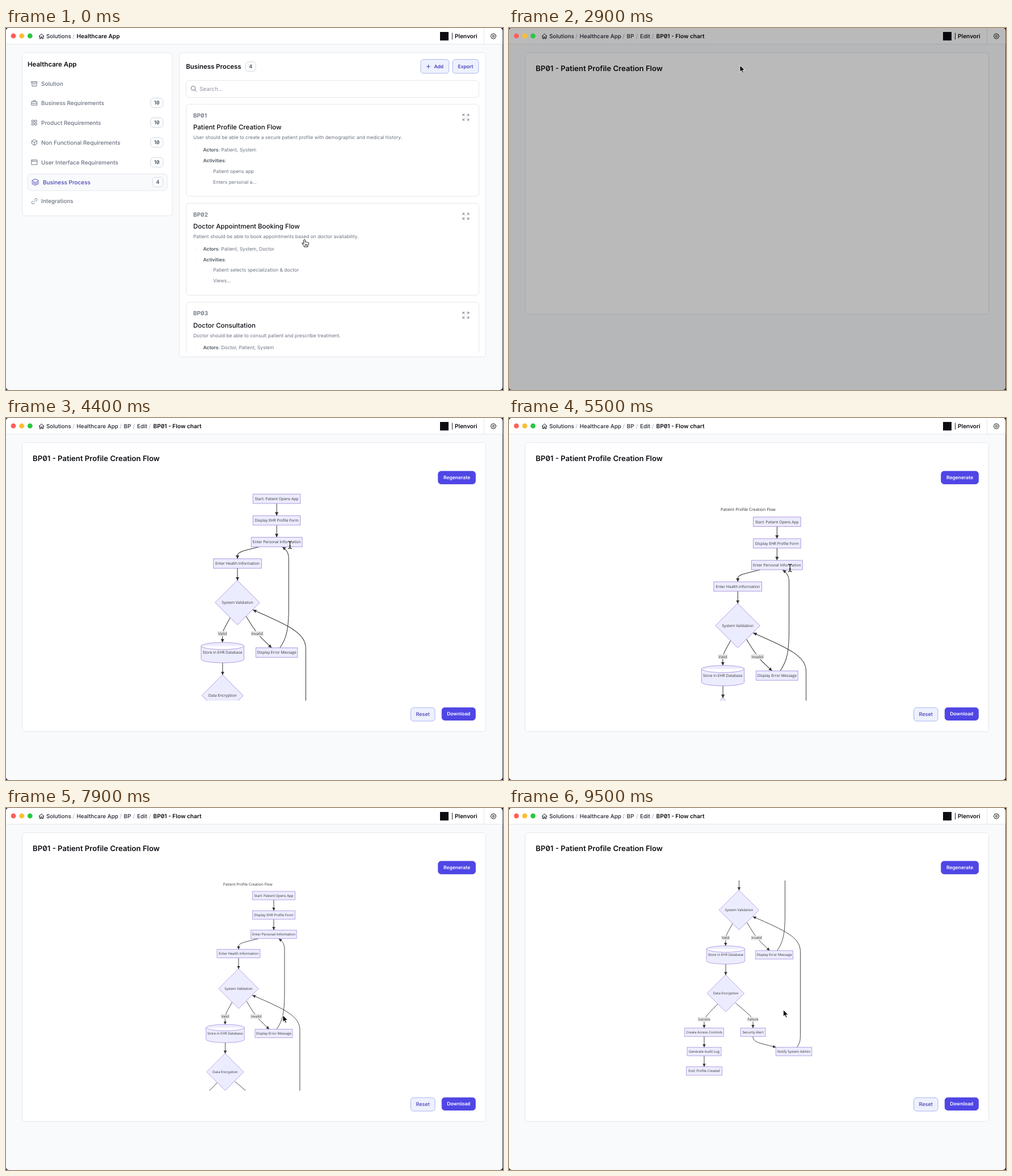
Recreate the animation shown at these times as an HTML page. Size 876 px wide and 639 px high, loop 10000 ms.

```html
<!DOCTYPE html>
<html lang="en">
<head>
<meta charset="utf-8">
<title>Business process flow</title>
<style>
html, body { margin: 0; width: 100%; height: 100%; overflow: hidden; background: #1d1830; }
svg { display: block; }
text { font-family: Inter, sans-serif; font-feature-settings: "zero"; text-rendering: geometricPrecision; white-space: pre; }
#chart text { font-family: "Open Sans", "Noto Sans", sans-serif; }
</style>
</head>
<body>
<svg id="stage" width="876" height="639" viewBox="0 0 876 639" xmlns="http://www.w3.org/2000/svg"></svg>
<script>
const LINE = '#e5e7eb', GRAY = '#6b7280', DARK = '#374151', INK = '#0b0d12';
const INDIGO = '#4f46e5', VIOLET = '#4a41b5', PALE = '#edf1fd', EDGE = '#a9b5ee';
const SMALL = 8.45, BODY = 9.87, HEAD = 11.5, BIG = 13.15;

// y is the optical centre of the line
const text = (x, y, s, size = BODY, fill = GRAY, weight = 400, anchor = 'start') =>
  `<text x="${x}" y="${y + size * 0.364}" font-size="${size}" fill="${fill}" font-weight="${weight}" text-anchor="${anchor}">${s}</text>`;
const mid = (x, y, s, size, fill, weight) => text(x, y, s, size, fill, weight, 'middle');
const bold = (s, fill = '#4b5563') => `<tspan font-weight="600" fill="${fill}">${s}</tspan>`;
const box = (x, y, w, h, fill = '#fff', stroke = LINE, r = 5) =>
  `<rect x="${x}" y="${y}" width="${w}" height="${h}" rx="${r}" fill="${fill}" stroke="${stroke}"/>`;
const path = (d, stroke = GRAY, width = 1, fill = 'none', extra = '') =>
  `<path d="${d}" fill="${fill}" stroke="${stroke}" stroke-width="${width}" stroke-linecap="round" stroke-linejoin="round" ${extra}/>`;
const dot = (x, y, r, fill) => `<circle cx="${x}" cy="${y}" r="${r}" fill="${fill}"/>`;
const at = (x, y, s) => `<g transform="translate(${x} ${y})">${s}</g>`;
const button = (x, y, w, h, s) =>
  box(x, y, w, h, INDIGO, INDIGO) + mid(x + w / 2, y + h / 2, s, 8.5, '#fff', 600);
const ghost = (x, y, w, h) => box(x, y, w, h, PALE, EDGE);

const crumbX = [71, 124.5, 207.5, 231, 259.5], slashX = [119, 202, 225.5, 253.5];

function header(names) {
  let s = `<path d="M0 0H876V28H0Z" fill="#fff"/>` + path('M0 28.5H876M842.5 0V28', LINE);
  s += at(62.5, 14.5, path('M-4.4 .2L0-4.2L4.4 .2M-3.2-.8V4.3H-1V1.2H1V4.3H3.2V-.8', INK, 1));
  names.forEach((n, i) => {
    const last = i === names.length - 1;
    s += text(crumbX[i], 14.5, n, last ? 10.1 : BODY, last ? INK : '#1f2430', last ? 600 : 500);
    if (!last) s += mid(slashX[i], 14.5, '/', BODY, '#a3a8b3');
  });
  s += '<rect x="765" y="7" width="15" height="15" fill="#0b0d12"/>' + path('M786.5 9V20', INK, .9);
  s += text(791, 14.5, 'Plenvori', 10.1, INK, 600);
  let gear = '';
  for (let i = 0; i < 32; i++) {
    const a = (i - .5) * Math.PI / 16, r = i % 4 < 2 ? 4.8 : 3.9;
    gear += (i ? 'L' : 'M') + (r * Math.cos(a)).toFixed(2) + ' ' + (r * Math.sin(a)).toFixed(2);
  }
  return s + at(859, 14.5, path(gear + 'Z', INK, 1) + '<circle r="1.6" fill="none" stroke="#0b0d12"/>');
}

const badge = (x, y, w, n) => box(x - w / 2, y - 8.5, w, 17, '#fbfcfd', '#d5d9e0') + mid(x, y, n, 9.1, DARK, 500);

const navItems = [
  ['Solution', 98.5, 'M-4.8-4H4.8V-1.6H-4.8ZM-4-1.6V4.2H4V-1.6M-1.3 .7H1.3'],
  ['Business Requirements', 132, 'M-4.7-2H4.7V4.2H-4.7ZM-2-2V-4H2V-2M-4.7 .8Q0 2.4 4.7 .8', 10],
  ['Product Requirements', 167, 'M-4.2-4.2H-1V-1H-4.2ZM1-4.2H4.2V-1H1ZM-4.2 1H-1V4.2H-4.2ZM1 1H4.2V4.2H1Z', 10],
  ['Non Functional Requirements', 202, 'M0-5L4.5-2.5V2.5L0 5L-4.5 2.5V-2.5ZM-4.5-2.5L0 0L4.5-2.5M0 0V5', 10],
  ['User Interface Requirements', 237, 'M-4.8-4.2H4.8V4.2H-4.8ZM-4.8-1.8H4.8M-3.2-3H-3', 10],
  ['Business Process', 272, 'M0-5.4L6-2.3L0 .8L-6-2.3ZM-6 .2L0 3.2L6 .2M-6 2.7L0 5.7L6 2.7', 4],
  ['Integrations', 305.7, 'M-1.2 1.2L1.2-1.2M-.3-2.8L1.6-4.4A2 2 0 0 1 4.4-1.6L2.8 .3M.3 2.8L-1.6 4.4A2 2 0 0 1-4.4 1.6L-2.8-.3']
];

function processCard(y, id, title, desc, actors, steps) {
  const row = (dx, dy, s) => dot(dx - 13, y + dy, .8, '#e3e5ea') + text(dx, y + dy, s, SMALL);
  let s = box(317.5, y, 516, 162.4) + text(330, y + 19.7, id, 10, GRAY, 600) +
    text(330, y + 40.7, title, HEAD, INK, 500) + text(330, y + 58.7, desc, SMALL) +
    row(347.5, 80.3, bold('Actors') + ': ' + actors) + row(347.5, 99.2, bold('Activities') + ':');
  steps.forEach((t, i) => s += row(365, 118.1 + 18.9 * i, t));
  return s + at(810.5, y + 23, path('M-5.3-2.3V-5.3H-2.3M-5-5L-2-2M2.3-5.3H5.3V-2.3M5-5L2-2M-5.3 2.3V5.3H-2.3M-5 5L-2 2M2.3 5.3H5.3V2.3M5 5L2 2', GRAY, .9));
}

function listPage() {
  let s = box(28.5, 43.5, 264.5, 288) + text(38, 64, 'Healthcare App', HEAD, INK, 600);
  for (const [name, y, icon, n] of navItems) {
    const on = n === 4, x = on ? 65 : 62;
    if (on) s += box(38.5, 257.5, 245.5, 29.5, '#f8fafc');
    s += at(on ? 51.7 : 50, y, path(icon, on ? VIOLET : GRAY, .95)) + text(x, y, name, 9.95, on ? VIOLET : GRAY, 500);
    if (n) s += on ? badge(267.5, y, 18.5, n) : badge(265.8, y, 22, n);
  }
  s += box(305.5, 43.5, 540, 537) + text(317.3, 68, 'Business Process', 11.4, INK, 600) + badge(431.2, 68, 18, 4);
  s += ghost(731, 55.5, 49.8, 24.5) + path('M741.5 68H747.5M744.5 65V71', VIOLET) + text(754.5, 68, 'Add', 8.5, VIOLET, 600);
  s += ghost(787.2, 55.5, 45.8, 24.5) + mid(810, 68, 'Export', 8.5, VIOLET, 600);
  s += box(317.5, 92.5, 516, 30) + '<circle cx="330" cy="106.3" r="3.8" fill="none" stroke="#6b7280"/>' +
    path('M332.9 109.2L335.6 112') + text(341, 107.5, 'Search...', BODY, '#8f95a1');
  return s + '<g clip-path="url(#listClip)">' +
    processCard(134.6, 'BP01', 'Patient Profile Creation Flow', 'User should be able to create a secure patient profile with demographic and medical history.', 'Patient, System', ['Patient opens app', 'Enters personal a...']) +
    processCard(309.3, 'BP02', 'Doctor Appointment Booking Flow', 'Patient should be able to book appointments based on doctor availability.', 'Patient, System, Doctor', ['Patient selects specialization &amp; doctor', 'Views...']) +
    processCard(484, 'BP03', 'Doctor Consultation', 'Doctor should be able to consult patient and prescribe treatment.', 'Doctor, Patient, System', []) + '</g>';
}

function chips(y, kind, shift) {
  const chip = (x, w, n) => box(x, y - 10.8, w, 21.5, '#fafbfc', '#d9dce2') + text(x + 6, y, kind + n, BODY, DARK, 500) +
    path(`M${x + w - 14.5} ${y - 3}l6 6m0-6l-6 6`, GRAY, .9);
  const x = 168.3 - shift;
  return text(41, y - 24, `Included ${kind}s`, BODY, '#1f2937', 500) + chip(41.3, 59, '02') + chip(105.7 - shift / 2, 57.2, '01') +
    ghost(x, y - 10.8, 46.2, 21.5) + text(x + 6, y, 'Add', BODY, VIOLET, 500) +
    path(`M${x + 29} ${y}h10m-3.2-3.2l3.2 3.2l-3.2 3.2`, VIOLET);
}

// rows: [kind, centre y, content]
function includeCard(y, h, check, rows) {
  let s = box(525, y, 308.5, h);
  for (const [kind, cy, t] of rows) {
    if (kind === 'id') s += text(537, cy, t, 10, GRAY, 600);
    if (kind === 'title') s += text(537, cy, t, HEAD, INK, 500);
    if (kind === 'line') s += text(537, cy, t, SMALL);
    if (kind === 'head') s += text(537, cy, t, SMALL, '#4b5563', 600);
    if (kind === 'item') s += dot(541.5, cy, .8, '#e3e5ea') + text(554.5, cy, t, SMALL);
    if (kind === 'more') s += text(554.5, cy, t, SMALL);
  }
  return check ? s + box(809.8, check - 5.5, 11, 11, INDIGO, INDIGO, 1.5) + path(`M812.3 ${check + .2}l2.2 2.3l4-4.8`, '#fff', 1.5) : s;
}

function editPage() {
  let s = box(28.5, 43.5, 472, 591) + path('M28.5 92.5H500.5M28.5 468.5H500.5', LINE) + text(41, 68, 'BP01', BIG, INK, 600);
  s += `<g id="flowBtn">${ghost(373.3, 55.5, 75.5, 24.5)}</g>` + mid(411, 68, 'View BP Flow', 8.5, VIOLET, 600);
  s += box(458, 55.8, 30.3, 24, '#dc2626', '#dc2626') +
    at(473, 68, path('M-4.4-3.3H4.4M-1.6-3.3V-5H1.6V-3.3M-3.5-3.3L-3 5H3L3.5-3.3M-1.1-1V3M1.1-1V3', '#fff', 1));
  const star = ' <tspan fill="#dc2626">*</tspan>';
  s += text(41, 116.5, 'Title' + star, BODY, '#4b5563') + box(41, 128, 447.3, 29.7) + text(49, 143, 'Patient Profile Creation Flow', BODY, '#1f2937');
  s += text(41, 174.8, 'Description' + star, BODY, '#4b5563') + box(41, 186.7, 447.3, 269.8);
  s += path('M41 222.3H488.3', LINE) + path('M81.5 197V211.5M139.5 197V211.5', '#d1d5db');
  s += text(50.3, 204.5, 'Aa', 10, DARK, 500) + path('M67.8 203.5l2.2 2.2l2.2-2.2', GRAY, .9);
  s += mid(97.5, 204.5, 'B', 10, INK, 700) + path('M121.5 200.7H125.5M119.5 208.3H123.5M123.5 200.7L121.5 208.3', DARK, .9);
  s += path('M154.5 201H160M154.5 204.5H160M154.5 208H160M151.3 200V203M150.6 206H152L150.8 209H152.2', DARK, .9);
  s += path('M178.8 201H185.5M178.8 204.5H185.5M178.8 208H185.5', DARK, .9) + [201, 204.5, 208].map(y => dot(175.9, y, .8, DARK)).join('');
  s += text(49, 239, 'User should be able to create a secure patient profile with demographic and medical history.', BODY, DARK);
  s += dot(55, 268, 1.7, '#c9cdd4') + text(69.5, 268, bold('Actors', '#111827') + ': Patient, System', BODY, DARK);
  s += dot(55, 292.7, 1.7, '#c9cdd4') + text(69.5, 292.7, bold('Activities', '#111827') + ':', BODY, DARK);
  ['Patient opens app', 'Enters personal and health info', 'System verifies and stores data securely'].forEach((t, i) => {
    const y = 317.7 + 24.7 * i;
    s += dot(75.5, y, 1.7, '#c9cdd4') + text(90, y, t, BODY, DARK);
  });
  s += box(333.2, 480.8, 100, 24.5) + text(357, 493, 'Enhance with AI', 8.5, '#1f2937', 600) +
    at(347, 493, path('M-1-3Q-.7-.3 2.5 0Q-.7 .3-1 3Q-1.3 .3-4 0Q-1.3-.3-1-3Z', INK, .6, INK) + path('M2.7-3.8V-1.6M1.6-2.7H3.8M2.7 1.6V3.8M1.6 2.7H3.8', INK, .8));
  s += button(439.8, 481.3, 48.2, 22.4, 'Update') + chips(560.3, 'BRD', 0) + chips(611.3, 'PRD', 1);

  s += box(513, 43.5, 332.5, 591) + path('M513 83.5H845.5', LINE) + mid(578, 64, 'Chat', BODY, GRAY, 500);
  s += box(640.5, 48.3, 200, 30.2, '#e9edfb', '#cfd8f5') + mid(740.5, 64, 'Include BRDs &amp; PRDs', BODY, VIOLET, 500);
  s += box(523.7, 94.5, 154, 29.8, '#e9edfb', '#cfd8f5') + mid(600.7, 109.7, 'PRD ( 2 )', BODY, VIOLET, 500) + mid(757.3, 109.7, 'BRD ( 2 )', BODY, GRAY, 500);
  s += includeCard(136.7, 196.3, 235, [['id', 155, 'PRD01'], ['title', 173.3, 'Core Security &amp; Compliance Framework'],
    ['line', 191, 'Implement comprehensive security infrastructure with end-to-'], ['line', 203, 'end...'], ['head', 227, 'Screens:'],
    ['item', 244.3, bold('Login Screen:') + ' Secure authentication interface with MFA'], ['more', 256.3, 'options...'], ['head', 280, 'Personas:'],
    ['item', 297.5, bold('System Administrator:') + ' Manages security protocols and'], ['more', 309.5, 'access co...']]);
  s += includeCard(345.5, 204, 447, [['id', 363.5, 'PRD02'], ['title', 382, 'Unified EHR Management System'],
    ['line', 399.7, 'Create a centralized EHR system with real-time access,'], ['line', 411.7, 'standardi...'], ['head', 435.5, 'Screens:'],
    ['item', 453, bold('Patient Records Dashboard:') + ' Central hub for accessing'], ['more', 465, 'patient i...'], ['head', 489.5, 'Personas:'],
    ['item', 507, bold('Physicians:') + ' Create and access patient records'], ['item', 526, bold('Nurses:') + ' Update...']]);
  return s + '<g clip-path="url(#includeClip)">' + includeCard(562, 60, 0, []) + '</g>';
}

function flowChart() {
  const fill = '#ececff', rim = '#a78fdc';
  const label = (x, y, s, size = 6) => mid(x, y, s, size, '#333');
  const node = (x, y, w, s) => `<rect x="${x - w / 2}" y="${y - 7.5}" width="${w}" height="15" fill="${fill}" stroke="${rim}" stroke-width=".8"/>` + label(x, y, s);
  const diamond = (x, y, r, s) => path(`M${x} ${y - r}l${r} ${r}l${-r} ${r}l${-r} ${-r}Z`, rim, .8, fill) + label(x, y, s);
  const tag = (x, y, w, s) => `<rect x="${x - w / 2}" y="${y - 4}" width="${w}" height="8" fill="#e8e8e8"/>` + label(x, y, s);
  const edges = [
    'M474 202V221.2', 'M474 236V255.4', 'M447 270.5C420 277 412 279 412 284V289.5', 'M412 304.5V324',
    'M401 382C391 400 388.3 404 388.3 411V422', 'M426 381C434 394 440 405 450 415L466 430.5',
    'M479 430.5C490 415 493 400 493 365V290C493 280 490 276 483 270.7', 'M388.5 454V473.5',
    'M374 525C358 542 350.5 548 350.5 556V567', 'M406 523C428 542 436.5 548 436.5 556V567',
    'M436.5 582C436.5 592 445 593 477 601', 'M350.5 582V601', 'M350.5 616V635.5',
    'M514 601C520 592 520 588 520 578V432C520 408 496 396 436.5 370.5'
  ];
  return label(428.3, 175, 'Patient Profile Creation Flow', 6.6) +
    edges.map(d => path(d, '#333', .9, 'none', 'marker-end="url(#tip)"')).join('') +
    node(474, 194.5, 75, 'Start: Patient Opens App') + node(474, 228.7, 75, 'Display EHR Profile Form') +
    node(474, 263, 80.5, 'Enter Personal Information') + node(412, 297, 76, 'Enter Health Information') +
    diamond(412, 359, 35, 'System Validation') +
    path('M354.6 427.6A33.8 5.6 0 0 1 422.2 427.6V448.6A33.8 5.6 0 0 1 354.6 448.6ZM354.6 427.6A33.8 5.6 0 0 0 422.2 427.6', rim, .8, fill) +
    label(388.4, 438, 'Store in EHR Database') + node(474, 438, 66, 'Display Error Message') +
    diamond(388.5, 506, 32.5, 'Data Encryption') + node(350.5, 574.5, 69, 'Create Access Controls') +
    node(436.5, 574.5, 44, 'Security Alert') + node(350.5, 608.5, 60, 'Generate Audit Log') +
    node(508.5, 608.5, 63.5, 'Notify System Admin') + node(350.5, 643, 63, 'End: Profile Created') +
    tag(388.3, 408, 15, 'Valid') + tag(443, 408, 20, 'Invalid') + tag(350.5, 552, 21, 'Success') + tag(436.5, 552, 20, 'Failure');
}

const flowPage = () => `<rect id="panel" x="28.5" y="43.5" width="817" rx="5" fill="#fff" stroke="${LINE}"/>` +
  text(47, 71.7, 'BP01 - Patient Profile Creation Flow', BIG, INK, 600) +
  `<g id="loaded">${button(761.8, 94, 65.6, 22.4, 'Regenerate')}${ghost(713.5, 511.3, 42.5, 23.7)}${mid(734.7, 523, 'Reset', 9.1, VIOLET, 500)}` +
  button(768.3, 511.3, 59, 22.2, 'Download') + `<g clip-path="url(#chartClip)"><g id="chart">${flowChart()}</g></g></g>`;

const cursors = {
  hand: path('M-1.3 1.2Q0-.8 1.3 1.2V5Q2.6 4 3.5 5.2Q4.8 4.4 5.7 5.8Q7.6 5.2 7.6 7.4Q7.6 10 6 11.5V13.3H-.6V12Q-2 10.5-4 7.6Q-4.6 6-3 6.2L-1.3 7.8ZM1.3 9V11M3 9V11M4.7 9V11', '#000', .9, '#fff'),
  arrow: path('M0 0V11.6L2.7 9.1L4.6 13.4L6.6 12.5L4.7 8.4H8.4Z', '#fff', .9, '#000'),
  beam: ['#fff', '#000'].map((c, i) => path('M-3-6.5Q0-6.5 0-4V4Q0 6.5-3 6.5M3-6.5Q0-6.5 0-4M0 4Q0 6.5 3 6.5M-1.5 2H1.5', c, i ? 1.1 : 2.4)).join('')
};

const clip = (id, x, y, w, h, r = 0) => `<clipPath id="${id}"><rect x="${x}" y="${y}" width="${w}" height="${h}" rx="${r}"/></clipPath>`;
const group = (id, s) => `<g id="${id}">${s}</g>`;
const trail = ['Solutions', 'Healthcare App', 'BP', 'Edit', 'BP01 - Flow chart'];

document.getElementById('stage').innerHTML =
  `<defs>${clip('window', 0, 0, 875.2, 639, 5)}${clip('listClip', 306, 124, 539, 449.5)}${clip('includeClip', 514, 555, 331, 15)}${clip('chartClip', 47, 128, 781, 371)}` +
  '<marker id="tip" markerUnits="userSpaceOnUse" markerWidth="6" markerHeight="6" refX="5.4" refY="2.7" orient="auto"><path d="M0 0L5.6 2.7L0 5.4Z" fill="#333"/></marker></defs>' +
  '<g clip-path="url(#window)"><rect width="876" height="639" fill="#f8fafc"/>' +
  group('list', header(trail.slice(0, 2)) + listPage()) +
  group('edit', header(trail.slice(0, 4)) + editPage()) +
  group('flow', header(trail) + flowPage()) +
  '<rect id="dim" width="876" height="639"/>' +
  dot(13, 14, 4.4, '#ff5f57') + dot(27.7, 14, 4.4, '#febc2e') + dot(42.3, 14, 4.4, '#28c840') +
  group('pointer', Object.entries(cursors).map(([k, s]) => group(k, s)).join('')) + '</g>';

const $ = id => document.getElementById(id);
const show = (id, on) => $(id).setAttribute('display', on ? 'inline' : 'none');

// keys: [ms, ...values], eased between neighbours
function track(t, keys) {
  let i = keys.findIndex(k => k[0] > t);
  if (i < 0) i = keys.length;
  if (i === 0) return keys[0].slice(1);
  const a = keys[i - 1], b = keys[i] || a;
  let p = b === a ? 0 : (t - a[0]) / (b[0] - a[0]);
  p = p * p * (3 - 2 * p);
  return a.slice(1).map((v, n) => v + (b[n + 1] - v) * p);
}

const pointerKeys = [[400, 526, 373], [1500, 408.5, 68], [1900, 408.5, 68], [2000, 407, 66], [3400, 407, 66], [3700, 760, 478],
  [3900, 760, 478], [4400, 500.5, 224], [4900, 500.5, 224], [5600, 495, 267], [7300, 495, 267], [7600, 490, 406],
  [7700, 490, 406], [8300, 482, 252], [8600, 482, 381], [8800, 482, 381], [9100, 483.5, 356.5]];
// scale and offset of the chart: drag, zoom out at the pointer, two more drags
const chartKeys = [[4900, 1.115, -51.4, -74.3], [5600, 1.115, -56.4, -31.3], [6400, 1.115, -56.4, -31.3], [6600, 1, 0, 0],
  [7700, 1, 0, 0], [8300, 1, -8, -154], [8800, 1, -8, -154], [9100, 1, -6.5, -178.7]];
const dimKeys = [[1800, 0], [2100, .27], [2900, .27], [3300, 0]];

function draw(ms) {
  const t = Math.floor(ms % 10000 / 100) * 100;
  const page = t < 100 ? 'list' : t < 1900 ? 'edit' : 'flow';
  for (const id of ['list', 'edit', 'flow']) show(id, id === page);
  $('flowBtn').firstChild.setAttribute('fill', t < 1600 ? PALE : '#dfe4f6');
  const ready = t >= 3100;
  show('loaded', ready);
  $('panel').setAttribute('height', ready ? 510 : 461.5);
  $('dim').setAttribute('opacity', track(t, dimKeys)[0]);
  const [k, x, y] = track(t, chartKeys);
  $('chart').setAttribute('transform', `translate(${x} ${y}) scale(${k})`);
  const kind = t < 500 || t >= 1600 && t < 1900 ? 'hand' : t >= 4400 && t < 7400 ? 'beam' : 'arrow';
  for (const id in cursors) show(id, id === kind);
  $('pointer').setAttribute('transform', `translate(${track(t, pointerKeys).join(' ')})`);
}

const start = performance.now();
function loop() {
  draw(performance.now() - start);
  requestAnimationFrame(loop);
}
loop();
</script>
</body>
</html>
```
